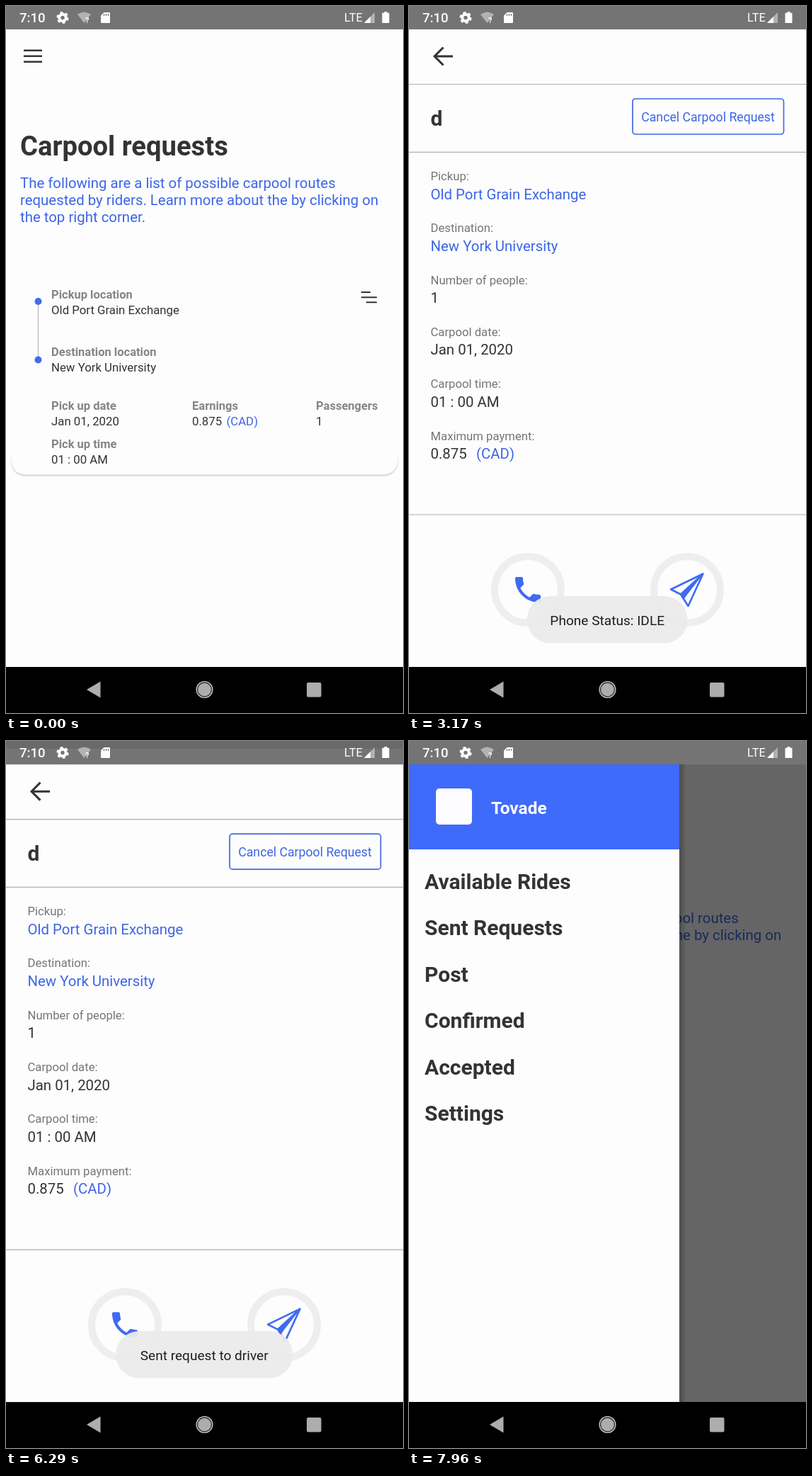
Recreate the animation shown at these times as an HTML page. Size 561 by 998 pixels, loop 8000 ms.

```html
<!DOCTYPE html>
<html lang="en">
<head>
<meta charset="utf-8">
<title>Carpool requests</title>
<style>
  html, body { margin: 0; width: 100%; height: 100%; overflow: hidden; background: #000; }
  svg { display: block; width: 100vw; height: 100vh; font-family: Roboto, sans-serif; }
  text { white-space: pre; }
  .ink { fill: #333; }
  .blue { fill: #3d66e4; }
  .grey { fill: #757575; }
  .bold { font-weight: 700; }
  .line { fill: none; stroke: #333; stroke-width: 2.5; }
  .rule { stroke: #adadb8; stroke-width: 1.2; }
</style>
</head>
<body>
<svg viewBox="0 0 561 998">
  <defs>
    <clipPath id="reveal"><rect id="revealBox" width="561" height="998"/></clipPath>
    <linearGradient id="edge"><stop stop-opacity=".25"/><stop offset="1" stop-opacity="0"/></linearGradient>
    <linearGradient id="cardEdge" x2="0" y2="1">
      <stop offset=".88" stop-color="#c4c4d0" stop-opacity="0"/><stop offset="1" stop-color="#c4c4d0"/>
    </linearGradient>
    <filter id="soft"><feGaussianBlur stdDeviation="1"/></filter>
  </defs>

  <g id="list">
    <rect width="561" height="933" fill="#fdfdfe"/>
    <rect width="561" height="33" fill="#747474"/>
    <path class="line" d="M25 62.7h26M25 70.7h26M25 78.7h26"/>
    <g id="intro"></g>
    <g id="card">
      <rect x="7" y="386" width="547" height="277" rx="20" fill="url(#cardEdge)" filter="url(#soft)"/>
      <rect x="8" y="380" width="545" height="281.5" rx="19" fill="#fdfdfe"/>
      <path d="M45.5 417v82" stroke="#c2c2c8" stroke-width="1.5"/>
      <circle cx="45.5" cy="417" r="5" fill="#436ceb"/>
      <circle cx="45.5" cy="499.5" r="5" fill="#436ceb"/>
      <path class="line" style="stroke-width:2" d="M502 404h13M502 411.3h22M509 418.3h15"/>
    </g>
    <g id="drawerLayer">
      <rect id="scrim" y="33" width="561" height="900"/>
      <g id="drawer">
        <rect x="382" y="33" width="10" height="900" fill="url(#edge)"/>
        <rect y="33" width="382" height="900" fill="#fdfdfe"/>
        <rect y="33" width="382" height="120" fill="#3f6bfb"/>
        <rect x="38" y="67" width="51" height="51" rx="5" fill="#fdfdff"/>
      </g>
    </g>
  </g>

  <g id="detail" clip-path="url(#reveal)">
    <rect width="561" height="998"/>
    <rect width="561" height="933" fill="#fdfdfe"/>
    <rect width="561" height="33" fill="#747474"/>
    <path class="line" style="stroke-width:3" d="M62 71H37M48.5 58.5L36 71l12.500 12.500"/>
    <path class="rule" d="M0 110.500h561M0 206.300h561M0 718h561"/>
    <rect x="316" y="131" width="213.500" height="50" rx="4" fill="none" stroke="#4069e2" stroke-width="1.700"/>
    <g fill="none" stroke="#eeeeef" stroke-width="10">
      <circle cx="168" cy="824" r="47"/><circle cx="393" cy="824" r="47"/>
    </g>
    <path fill="#3f6bf0" transform="translate(144 800) scale(2)" d="M6.62 10.79c1.44 2.83 3.76 5.140 6.590 6.590l2.200-2.200c.27-.27.67-.36 1.020-.24 1.120.37 2.330.57 3.570.57.55 0 1 .45 1 1V20c0 .55-.45 1-1 1C10.610 21 3 13.390 3 4c0-.55.45-1 1-1h3.500c.55 0 1 .45 1 1 0 1.250.2 2.450.57 3.570.11.35.03.74-.25 1.020z"/>
    <g stroke="#3f6bf0" stroke-width="2.600" stroke-linejoin="round">
      <path fill="none" d="M415.500 801.500L370 823.500l14 7 10.500 16.500zL384 830.500"/>
      <path fill="#3f6bf0" stroke-width="1" d="M412 806l-28 24.500 3.500 7.500 5-7z"/>
    </g>
  </g>

  <g fill="#fff">
    <g id="status">
      <circle cx="80" cy="16.500" r="4.700" fill="none" stroke="#fff" stroke-width="4"/>
      <circle cx="80" cy="16.500" r="7.300" fill="none" stroke="#fff" stroke-width="2.600" stroke-dasharray="4 3.640"/>
      <path opacity=".45" d="M101 12q9.500-7 19 0L110.500 24z"/>
      <path d="M138.500 9H146q1 0 1 1v13q0 1-1 1h-11q-1 0-1-1v-9.500z"/>
      <path stroke="#777" stroke-width="1.300" d="M138.500 11v3M141.500 11v3M144.500 11v3"/>
      <path opacity=".45" d="M506 24l15-15v15z"/>
      <path d="M506 24l9-9v9z"/>
      <path d="M534.500 8h4v1.800h3V24h-10V9.800h3z"/>
    </g>
    <g opacity=".68">
      <path d="M114 965l19.500-11.500v23z"/>
      <rect x="425" y="955" width="20.500" height="20.500" rx="2"/>
    </g>
    <circle cx="280.500" cy="965" r="12" fill="#333"/>
    <circle cx="280.500" cy="965" r="11.300" fill="none" stroke="#ccc" stroke-width="1.300"/>
    <circle cx="280.500" cy="965" r="9.300" fill="#adadad"/>
  </g>
  <g id="idleToast"></g>
  <g id="sentToast"></g>
</svg>
<script>
const $ = id => document.getElementById(id);

function put(parent, x, y, size, cls, text, extra = '') {
  $(parent).insertAdjacentHTML('beforeend',
    `<text x="${x}" y="${y}" font-size="${size}" class="${cls}" ${extra}>${text}</text>`);
}

const place = 'Old Port Grain Exchange', school = 'New York University';
const date = 'Jan 01, 2020', time = '01 : 00 AM';

put('intro', 20, 210.5, 38.2, 'ink bold', 'Carpool requests');
['The following are a list of possible carpool routes',
 'requested by riders. Learn more about the by clicking on',
 'the top right corner.'].forEach((s, i) => put('intro', 20, 257 + 24 * i, 20.4, 'blue', s));

[[64, 412.5, 'Pickup location', place],
 [64, 494, 'Destination location', school],
 [64, 569.5, 'Pick up date', date],
 [263, 569.5, 'Earnings', '0.875'],
 [438, 569.5, 'Passengers', '1'],
 [64, 623.5, 'Pick up time', time]].forEach(([x, y, label, value]) => {
  put('card', x, y, 16.5, 'bold', label, 'fill="#858588"');
  put('card', x, y + 22.3, 16.8, 'ink', value);
});
put('card', 311.5, 591.8, 16.8, 'blue', '(CAD)');

put('detail', 30.5, 168.5, 30, 'ink bold', 'd');
put('detail', 422.5, 162.7, 17.7, 'blue', 'Cancel Carpool Request', 'text-anchor="middle"');
[['Pickup', place], ['Destination', school], ['Number of people', '1'],
 ['Carpool date', date], ['Carpool time', time], ['Maximum payment', '0.875']].forEach(([label, value], i) => {
  const y = 246 + 73.3 * i;
  put('detail', 30.5, y, 16.7, 'grey', label + ':');
  put('detail', 30.5, y + 26.5, 20.4, i < 2 ? 'blue' : 'ink', value);
});
put('detail', 95, 639, 20.4, 'blue', '(CAD)');

put('drawer', 116, 102.500, 24.5, 'bold', 'Tovade', 'fill="#fff"');
['Available Rides', 'Sent Requests', 'Post', 'Confirmed', 'Accepted', 'Settings']
  .forEach((s, i) => put('drawer', 22, 208.5 + 65.5 * i, 30, 'ink bold', s));

put('status', 19, 22.5, 18.6, '', '7:10', 'font-weight="500"');
put('status', 112, 24, 11, 'bold', '?');
put('status', 478, 22, 16.4, '', 'LTE');

function toast(id, width, text) {
  $(id).innerHTML = `<rect x="${280.2 - width / 2}" y="833" width="${width}" height="66.5" rx="33" fill="#ebebeb" fill-opacity=".95"/>`;
  put(id, 280.2, 873.8, 19.1, '', text, 'text-anchor="middle" fill="#1f1f1f"');
}
toast('idleToast', 227, 'Phone Status: IDLE');
toast('sentToast', 250, 'Sent request to driver');

const clamp = v => Math.min(1, Math.max(0, v));

// y at x on a cubic Bezier given as [x0, y0, x1, y1, x2, y2, x3, y3]
function curve(p, x) {
  const at = (s, k) => (1 - s) ** 3 * p[k] + 3 * s * (1 - s) ** 2 * p[k + 2]
    + 3 * s * s * (1 - s) * p[k + 4] + s ** 3 * p[k + 6];
  let lo = 0, hi = 1;
  for (let i = 0; i < 24; i++) {
    const mid = (lo + hi) / 2;
    if (at(mid, 0) < x) lo = mid; else hi = mid;
  }
  return at(lo, 1);
}
const glide = x => curve([0, 0, .4, 0, .2, 1, 1, 1], x);
const sweep = x => x < 1 / 6
  ? curve([0, 0, .05, 0, .1333, .06, .1667, .4], x)
  : curve([.1667, .4, .2083, .82, .25, 1, 1, 1], x);

const H = 998, MOVE = 425, OPEN = 1613, CLOSE = 6275, DRAWER = 7140;
const shift = (id, x, y) => $(id).setAttribute('transform', `translate(${x} ${y})`);
const show = (id, on) => $(id).style.display = on ? '' : 'none';

function fade(id, t, start, end) {
  const rise = 1 - (1 - clamp((t - start) / 500)) ** 2;
  const fall = 1 - clamp((t - end) / 450) ** 2;
  $(id).style.opacity = rise * fall;
}

function draw(t) {
  const closing = t >= CLOSE;
  const u = clamp((t - (closing ? CLOSE : OPEN)) / MOVE);
  const cover = closing ? 1 - glide(u) : glide(u);
  const clip = .959 * H * (closing ? sweep(u) : 1 - sweep(u));
  shift('list', 0, -.02 * H * cover);
  $('list').style.opacity = 1 - .09 * (closing ? 1 - u : clamp((t - OPEN) / 100));
  shift('detail', 0, .041 * H * (1 - cover));
  $('revealBox').setAttribute('y', clip);
  show('detail', t >= OPEN && t < CLOSE + MOVE);
  show('card', t < 3000);

  const k = Math.max(0, t - DRAWER) * .0166;
  const slide = 1 - (1 + k) * Math.exp(-k);
  show('drawerLayer', slide > 0);
  shift('drawer', 382 * (slide - 1), 0);
  $('scrim').style.opacity = .6 * slide ** 1.35;

  fade('idleToast', t, 1615, 3450);
  fade('sentToast', t, 3700, 7050);
}

function tick() {
  draw(performance.now() % 8000);
  requestAnimationFrame(tick);
}
tick();
</script>
</body>
</html>
```
